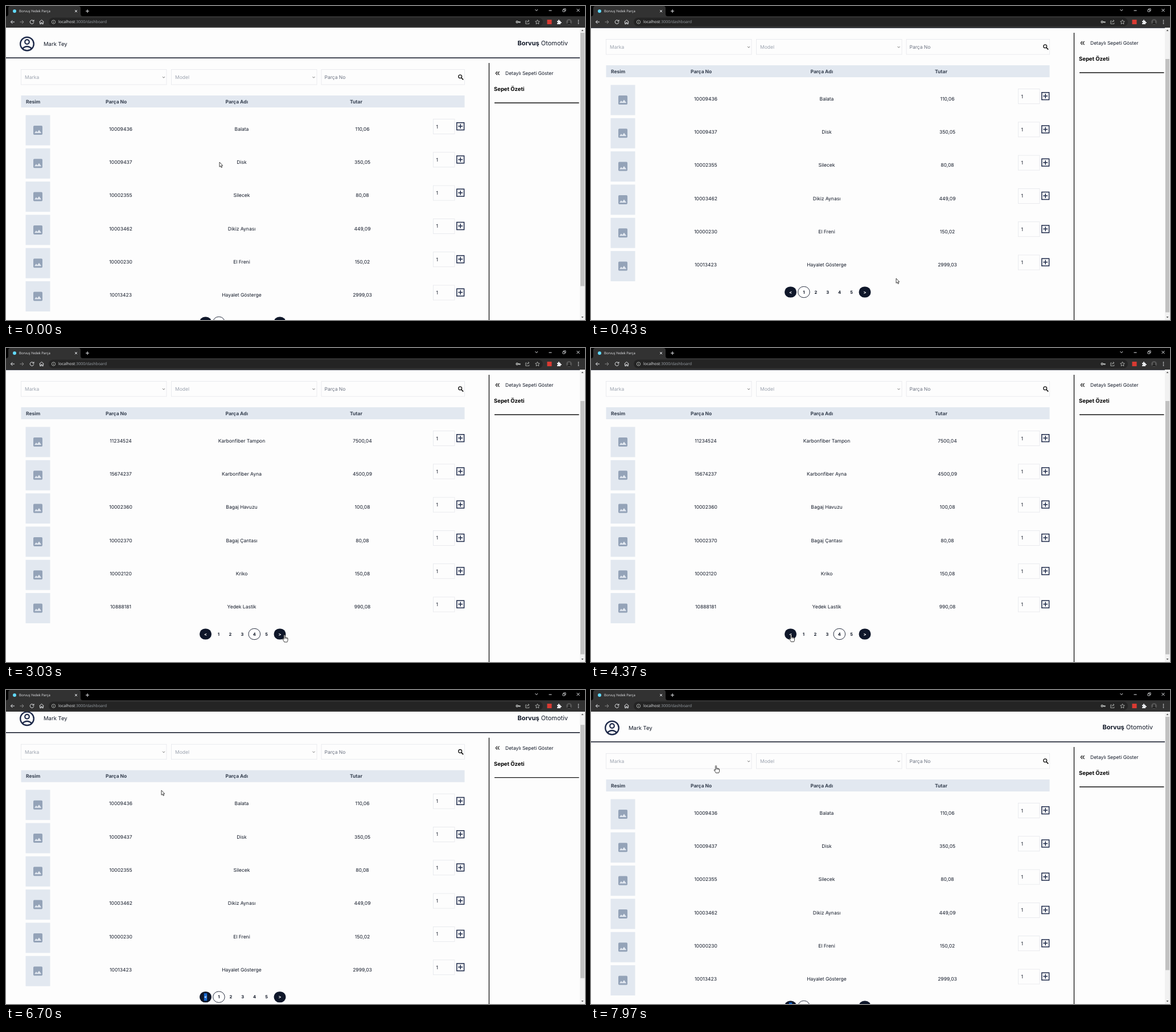
Animation, 1017 px wide and 551 px high, one loop 8000 ms. Source, as an HTML page:

```html
<!DOCTYPE html>
<html lang="tr">
<head>
<meta charset="utf-8">
<title>Yedek Parça</title>
<style>
  html, body { margin: 0; width: 100%; height: 100%; overflow: hidden; background: #fdfdfd; }
  svg { display: block; font: 8.5px Inter, sans-serif; fill: #111827; text-rendering: geometricPrecision; }
  .bold { font-weight: 700; }
  .mid { text-anchor: middle; }
  .icon { fill: none; stroke: #1e2a4a; stroke-width: 1.5; }
  .field { fill: #fdfdfd; stroke: #e5e7eb; stroke-width: .8; }
  .chrome { fill: none; stroke: #e8eaed; stroke-width: 1; font-family: "Open Sans", sans-serif; }
  .chrome text { fill: #e8eaed; stroke: none; }
</style>
</head>
<body>
<svg width="1017" height="551" viewBox="0 0 1017 551">
  <g id="page">
    <g class="icon" stroke-width="2.4">
      <circle cx="37" cy="66.5" r="11.8" stroke-width="2.4" style="stroke-width:2.4"/>
      <circle cx="37" cy="63" r="3.8" style="stroke-width:2.2"/>
      <path d="M29 74.5Q37 67.500 45 74.500" style="stroke-width:2.4"/>
    </g>
    <text x="66" y="69.500" font-size="9.5">Mark Tey</text>
    <text x="987" y="69" font-size="11" text-anchor="end"><tspan class="bold">Borvuş</tspan> Otomotiv</text>
    <path d="M0 91H1008" stroke="#0b1020" stroke-width="1.4"/>

    <rect class="field" x="26.500" y="111.500" width="255.500" height="26.500"/>
    <rect class="field" x="290.500" y="111.500" width="255.500" height="26.500"/>
    <rect class="field" x="554" y="111.500" width="251.500" height="26.500"/>
    <g fill="#9ca3af"><text x="33" y="128.200">Marka</text><text x="297" y="128.200">Model</text></g>
    <text x="559.500" y="128.200" fill="#6b7280">Parça No</text>
    <path d="M275 124l2 2.200 2-2.200M538.500 124l2 2.200 2-2.200" fill="none" stroke="#777"/>
    <g fill="none" stroke="#111" stroke-width="1.300"><circle cx="797.700" cy="123.700" r="2.900"/><path d="M799.800 126l3.400 3.400" stroke-width="1.700"/></g>

    <rect x="26.500" y="157" width="779" height="21" fill="#e2e8f0"/>
    <g class="bold" fill="#374151">
      <text x="35" y="170.700">Resim</text><text x="175" y="170.700">Parça No</text>
      <text x="385.500" y="170.700">Parça Adı</text><text x="604" y="170.700">Tutar</text>
    </g>
    <g id="rows"></g>
    <g id="pager" class="mid bold" font-size="7.500"></g>

    <path d="M848.500 100V620" stroke="#111" stroke-width="1.300"/>
    <path d="M863 115l-2.800 3 2.800 3M866.500 115l-2.800 3 2.800 3" fill="none" stroke="#111" stroke-width="1.100"/>
    <text x="877" y="121.200">Detaylı Sepeti Göster</text>
    <text x="857" y="149.300" class="bold" font-size="9.500" fill="#000">Sepet Özeti</text>
    <path d="M858 170H1006.500" stroke="#111" stroke-width="1.300"/>
  </g>

  <rect x="1008" y="38" width="9" height="513" fill="#f1f1f1"/>
  <rect id="thumb" x="1009" y="47" width="7" height="444.500" fill="#c1c1c1"/>
  <path d="M1010.500 44l2-2.500 2 2.500zM1010.500 545l2 2.500 2-2.500z" fill="#555"/>

  <g class="chrome">
    <path d="M0 0H1017V38H0z" fill="#000" stroke="none"/>
    <path d="M0 18Q4 18 4 14V4Q4 0 8 0H127Q131 0 131 4V14Q131 18 135 18H1017V38H0z" fill="#323232" stroke="none"/>
    <rect x="75" y="20.500" width="868" height="15" rx="7.500" fill="#242424" stroke="none"/>
    <circle cx="15" cy="9" r="3" fill="#61dafb" stroke="none"/>
    <text x="23" y="11.200" font-size="6">Borvuş Yedek Parça</text>
    <path d="M121 7l4 4m0-4l-4 4M140 9h6m-3-3v6M929.500 6l2.300 2.500 2.300-2.500M953.500 8h5M1002.500 5l5 5m0-5l-5 5"/>
    <path d="M978 6.500h3.500v3.500h-3.500zM979.500 6v-1.200h3.600v3.700h-1.200" stroke-width=".8"/>
    <path d="M15 28H8.500m3-3l-3 3 3 3"/>
    <path d="M24.500 28H31m-3-3l3 3-3 3" stroke="#8a8a8a"/>
    <path d="M48 25.800A3.300 3.300 0 1 0 48.800 28.500M49 24.300v2.500h-2.500M58.500 28l4-3.600 4 3.600M59.700 27.500v4h1.900v-2.500h1.800v2.500h1.900v-4"/>
    <g stroke="#c4c7c5" stroke-width=".8">
      <circle cx="83.500" cy="28" r="3.200"/><path d="M83.500 27.500v2.300m0-4v.8"/>
      <circle cx="897.700" cy="28" r="1.600" stroke-width="1.300"/><path d="M899 28h4v1.500m-1.600-1.500v1.500" stroke-width="1.300"/>
      <path d="M914.500 26h-1.700v5.300h6v-2M914.800 29q.5-3 4-3m-1.700-1.700l1.800 1.700-1.800 1.700"/>
      <path d="M933.500 24.300l1.100 2.500 2.700.3-2 1.800.6 2.700-2.400-1.400-2.400 1.400.6-2.700-2-1.800 2.700-.3z"/>
    </g>
    <text x="92" y="30.400" font-size="7">localhost<tspan fill="#9aa0a6">:3000/dashboard</tspan></text>
    <rect x="950.500" y="24" width="8" height="8" fill="#d93a32" stroke="none"/>
    <path d="M968 26h2q-.5-2 1-2t1 2h2v2q2-.5 2 1t-2 1v2h-6v-2q1.500 0 1.500-1t-1.500-1z" fill="#e8eaed" stroke="none"/>
    <circle cx="989" cy="28" r="5" fill="#555" stroke="none"/>
    <path d="M986 32q0-3.500 3-3.500t3 3.500z" fill="#222" stroke="none"/><circle cx="989" cy="27" r="1.700" fill="#222" stroke="none"/>
    <path d="M1005.500 24.500v1.400m0 1.400v1.400m0 1.400v1.400" stroke-width="1.400"/>
  </g>

  <path id="arrow" d="M0 0V8.300L1.900 6.600 3.200 9.600 4.600 9 3.300 6.100H5.700z" fill="#fff" stroke="#111" stroke-width=".8"/>
  <path id="hand" d="M-1 .8Q0-.8 1 .8V5Q2 4.200 2.800 5.200 3.800 4.500 4.500 5.700 5.800 5.200 6 6.700V9.500Q5.800 11.500 4.900 13H-.2Q-1 11-3 8.600-3.600 7.200-2.500 7.100L-1 8.400zM1 5v2M2.800 5.300v1.800M4.500 5.800v1.600" fill="#fff" stroke="#111" stroke-width=".8"/>
</svg>
<script>
const LOOP = 8000, PITCH = 58.3, PAGER_Y = 555;
const $ = id => document.getElementById(id);

const catalog = [
  ["10009436|Balata|110,06", "10009437|Disk|350,05", "10002355|Silecek|80,08",
   "10003462|Dikiz Aynası|449,09", "10000230|El Freni|150,02", "10013423|Hayalet Gösterge|2999,03"],
  ["10004512|Ön Far|850,05", "10004513|Arka Far|640,07", "10002780|Yağ Filtresi|95,04",
   "10003120|Hava Filtresi|120,09", "10000415|Direksiyon|1250,02", "10011876|Vites Topuzu|210,03"],
  ["10006721|Amortisör|780,06", "10006722|Radyatör|1450,05", "10002410|Buji|60,08",
   "10003875|Akü|1100,09", "10000562|Triger Kayışı|320,02", "10012094|Debriyaj Seti|2450,03"],
  ["11234524|Karbonfiber Tampon|7500,04", "15674237|Karbonfiber Ayna|4500,09", "10002360|Bagaj Havuzu|100,08",
   "10002370|Bagaj Çantası|80,08", "10002120|Kriko|150,08", "10888181|Yedek Lastik|990,08"]
];

// Tracks are [time, ...values]; page changes are hard cuts.
const pageTrack = [[0, 1], [1310, 2], [2210, 3], [2800, 4], [4470, 3], [5370, 2], [5800, 1]];
const scrollTrack = [[0, 0], [130, 0], [320, 53], [6600, 53], [6760, 0]];
const cursorTrack = [
  [0, 375, 274], [40, 375, 274], [430, 536, 478], [830, 489, 503], [3050, 489, 503],
  [3320, 420, 515], [3680, 351.5, 502.500], [6190, 351.5, 502.500], [6700, 273, 176],
  [6950, 265, 139], [7600, 219.500, 132.500]
];
const SELECT_AT = 5800;

function sample(track, t) {
  const next = track.findIndex(k => k[0] > t);
  if (next < 0) return track.at(-1).slice(1);
  const a = track[next - 1], b = track[next];
  const u = (t - a[0]) / (b[0] - a[0]), e = u * u * (3 - 2 * u);
  return a.slice(1).map((v, i) => v + (b[i + 1] - v) * e);
}

function rowMarkup(item, i) {
  const [number, name, price] = item.split("|");
  const label = (x, text) => `<text class="mid" x="${x}" y="218.800">${text}</text>`;
  return `<g transform="translate(0 ${i * PITCH})">
    <rect x="34.500" y="191.500" width="43" height="53" fill="#e2e8f0"/>
    <rect x="48" y="210" width="16" height="16" rx="1.800" fill="#94a3b8"/>
    <path d="M50 223l3-4 2 2.500 3-4 4.200 5.500z" fill="#e2e8f0"/>
    ${label(201.500, number)}${label(414, name)}${label(626, price)}
    <rect class="field" x="750.500" y="198.500" width="37.500" height="26"/>
    <text x="755.500" y="214.500">1</text>
    <path class="icon" d="M791.800 204.700h12.800v12.800h-12.800zM794.200 211.100h8M798.200 207.100v8"/></g>`;
}

function pagerMarkup(page, selected) {
  const button = (x, sign, mark) => `<rect x="${x - 10.5}" y="${PAGER_Y - 9.5}" width="21" height="19" rx="9.500" fill="#0f172a"/>
    ${mark ? `<rect x="${x - 2.7}" y="${PAGER_Y - 6.500}" width="5.400" height="13" fill="#1769d2"/>` : ""}
    <text x="${x}" y="${PAGER_Y + 2.700}" fill="#fff">${sign}</text>`;
  let out = button(350.500, "&lt;", selected) + button(481, "&gt;");
  for (let n = 1; n <= 5; n++) {
    const x = 353 + 20.900 * n - (n < page ? .9 : n === page ? .3 : 0) + (n === 1 ? .3 : 0);
    if (n === page) out += `<rect x="${x - 10.3}" y="${PAGER_Y - 9.600}" width="20.600" height="19.200" rx="9.600" fill="#fff" stroke="#0f172a" stroke-width=".9"/>`;
    out += `<text x="${x}" y="${PAGER_Y + 2.700}">${n}</text>`;
  }
  return out;
}

let shown = "";
function draw(t) {
  const page = pageTrack.findLast(k => k[0] <= t)[1], selected = t >= SELECT_AT;
  const state = page + "/" + selected;
  if (state !== shown) {
    $("rows").innerHTML = catalog[page - 1].map(rowMarkup).join("");
    $("pager").innerHTML = pagerMarkup(page, selected);
    shown = state;
  }
  const [scroll] = sample(scrollTrack, t), [x, y] = sample(cursorTrack, t);
  $("page").setAttribute("transform", `translate(0 ${-scroll})`);
  $("thumb").setAttribute("y", 47 + scroll * 46 / 53);

  const overButton = Math.abs(y + scroll - PAGER_Y) < 10 && (Math.abs(x - 350.500) < 11 || Math.abs(x - 481) < 11);
  const overSelect = y + scroll > 111 && y + scroll < 139 && x < 282;
  const pointing = overButton || overSelect;
  for (const [id, visible] of [["hand", pointing], ["arrow", !pointing]]) {
    $(id).setAttribute("transform", `translate(${x} ${y})`);
    $(id).setAttribute("visibility", visible ? "visible" : "hidden");
  }
}

const start = performance.now();
function tick() {
  draw((performance.now() - start) % LOOP);
  requestAnimationFrame(tick);
}
tick();
</script>
</body>
</html>
```
